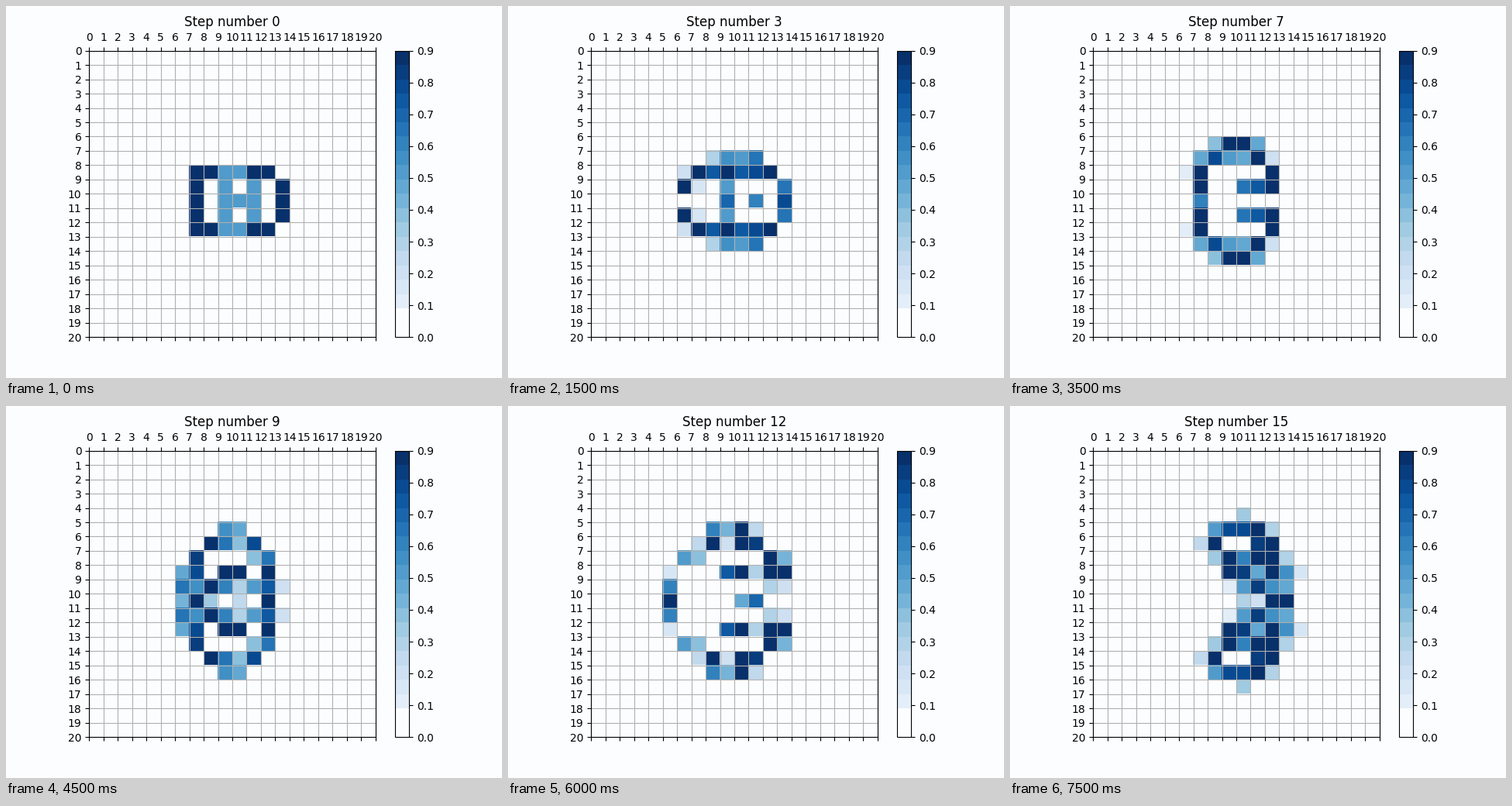
Animation, 640 px wide and 480 px high, one loop 8 s. Source, as a matplotlib script:

```python
import numpy as np
import matplotlib
import matplotlib.pyplot as plt
from matplotlib.animation import FuncAnimation
from matplotlib.colors import ListedColormap, to_rgba

SIZE, STEPS, BANDS = 20, 16, 20
STRONG, WEAK = 0.9, 0.5
PAPER = "#fcfdff"
ROOT = np.sqrt(2) + 1


def seed_grid():
    """Strong ring, open at its right corners, around a weak core."""
    grid = np.zeros((SIZE, SIZE))
    grid[[8, 12], 7:13] = STRONG
    grid[8:13, 7] = STRONG
    grid[9:12, 13] = STRONG
    grid[[8, 12], 9:11] = WEAK
    grid[9:12, [9, 11]] = WEAK
    grid[10, 10] = WEAK
    return grid


def evolve(a):
    """Semi-quantum life: blend of birth, survival and death by neighbour sum."""
    p = np.pad(a, 1)
    n = sum(p[i:i + SIZE, j:j + SIZE]
            for i in range(3) for j in range(3)) - a
    birth, keep, death = np.zeros((3, SIZE, SIZE))

    m = (n <= 1) | (n >= 4)
    death[m] = 1
    m = (n > 1) & (n <= 2)
    death[m], keep[m] = ROOT * (2 - n[m]), n[m] - 1
    m = (n > 2) & (n <= 3)
    keep[m], birth[m] = ROOT * (3 - n[m]), n[m] - 2
    m = (n > 3) & (n < 4)
    birth[m], death[m] = ROOT * (4 - n[m]), n[m] - 3

    return (keep * a + birth) / (keep + birth + death)


def banded_blues():
    """Evenly stepped blues whose two faintest steps fade into the paper."""
    colors = matplotlib.colormaps["Blues"](np.linspace(0, 1, BANDS))
    colors[:2] = to_rgba(PAPER)
    return ListedColormap(colors)


history = [seed_grid()]
while len(history) < STEPS:
    history.append(evolve(history[-1]))

fig, ax = plt.subplots(figsize=(6.4, 4.8), dpi=100, facecolor=PAPER)
image = ax.matshow(history[0], cmap=banded_blues(), vmin=0, vmax=STRONG,
                   extent=(0, SIZE, SIZE, 0))
fig.colorbar(image)
ax.set_xticks(range(SIZE + 1))
ax.set_yticks(range(SIZE + 1))
ax.grid(True)
title = ax.set_title("Step number 0")


def draw(step):
    image.set_data(history[step])
    title.set_text(f"Step number {step}")
    return image, title


anim = FuncAnimation(fig, draw, frames=STEPS, interval=500,
                     repeat=True, repeat_delay=0, blit=False)
plt.show()
```
